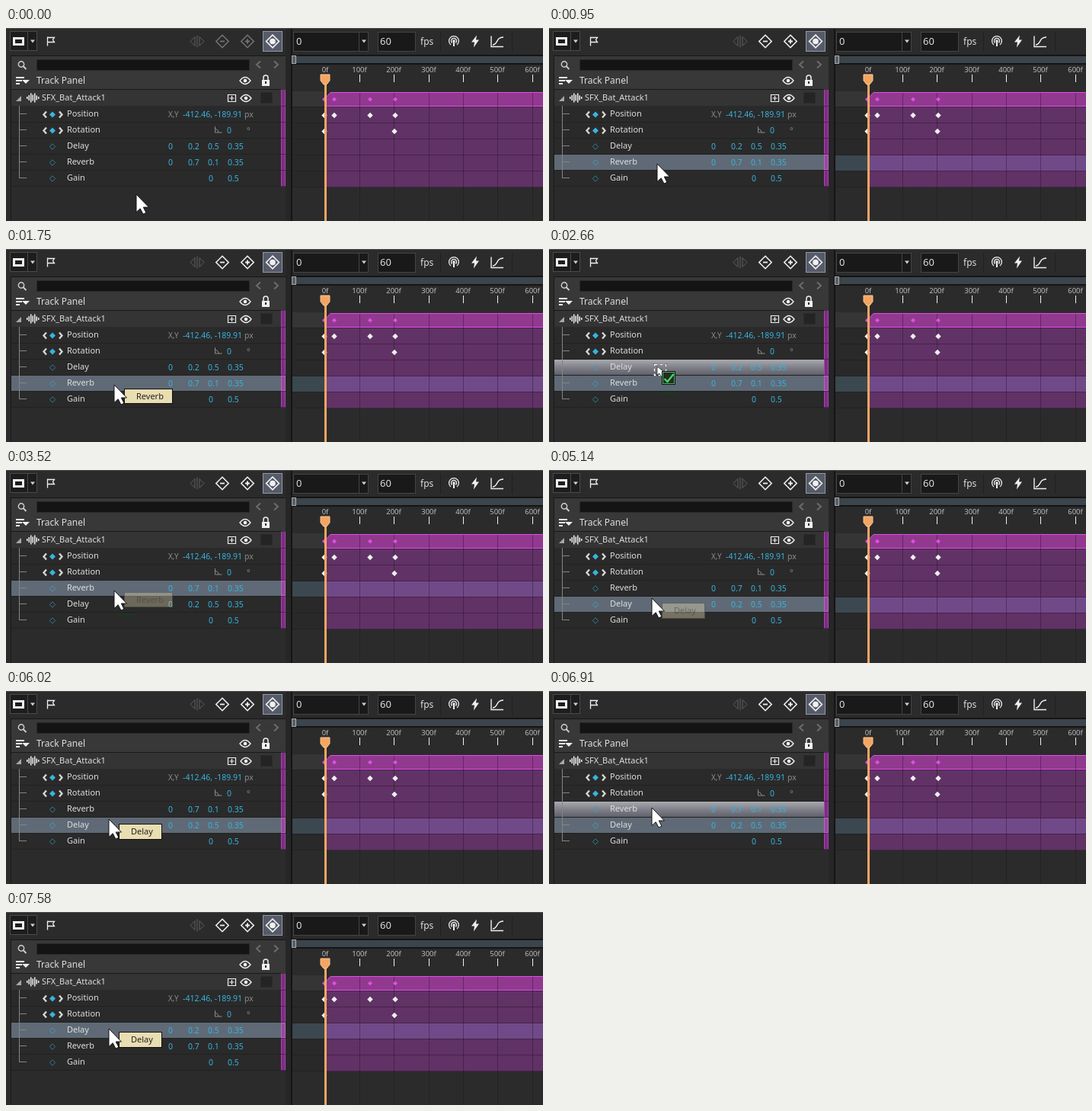
These frames come from a looping animation (705x253 px, 8000 ms). An HTML page with a canvas:

```html
<!DOCTYPE html>
<html lang="en">
<head>
<meta charset="utf-8">
<title>Track panel</title>
<style>
html, body { margin: 0; width: 100%; height: 100%; overflow: hidden; background: #2b2b2b; }
canvas { display: block; }
</style>
</head>
<body>
<canvas id="stage" width="705" height="253"></canvas>
<script>
const ctx = document.getElementById('stage').getContext('2d');
const LOOP = 8000, ROW = 21, FIRST_ROW = 103;
const CYAN = '#38b4de', WHITE = '#f0f0f0', GRAY = '#8a8a8a', PINK = '#e04ee6';
const GRID = [0, 1, 2, 3, 4, 5, 6].map(i => 419 + Math.floor(i * 136 / 3));

function rect(x, y, w, h, fill, border) {
  ctx.fillStyle = fill;
  ctx.fillRect(x, y, w, h);
  if (border) {
    ctx.strokeStyle = border;
    ctx.lineWidth = 1;
    ctx.strokeRect(x + .5, y + .5, w - 1, h - 1);
  }
}

function text(s, x, y, size = 11, color = '#dedede', align = 'left') {
  ctx.font = `${size}px "Noto Sans", "Open Sans", sans-serif`;
  ctx.textAlign = align;
  ctx.fillStyle = color;
  ctx.fillText(s, x, y);
}

// Draws SVG path data moved to (x, y).
function shape(d, x, y, fill, stroke, width = 1) {
  const path = new Path2D(d);
  ctx.save();
  ctx.translate(x, y);
  if (fill) { ctx.fillStyle = fill; ctx.fill(path); }
  if (stroke) { ctx.strokeStyle = stroke; ctx.lineWidth = width; ctx.stroke(path); }
  ctx.restore();
}

const diamond = (x, y, r, fill, stroke, width) =>
  shape(`M0 ${-r}L${r} 0L0 ${r}L${-r} 0Z`, x, y, fill, stroke, width);

const circle = (x, y, r, fill, stroke, width) =>
  shape(`M${-r} 0a${r} ${r} 0 1 0 ${2 * r} 0a${r} ${r} 0 1 0 ${-2 * r} 0Z`, x, y, fill, stroke, width);

const downArrow = (x, y) => shape('M-3 -1.5H3L0 2.5Z', x, y, '#d0d0d0');

function eye(x, y) {
  shape('M-7 0Q0 -9 7 0Q0 9 -7 0Z', x, y, null, WHITE, 1.3);
  circle(x, y, 2.3, WHITE);
}

function leftToolbar(active) {
  rect(5, 4, 36, 26, '#1d1d1d', '#4a4a4a');
  rect(28, 5, 1, 24, '#4a4a4a');
  rect(9, 12, 15, 11, WHITE);
  rect(12, 15, 9, 5, '#1d1d1d');
  downArrow(35, 17);
  shape('M0 0V12M0 1H9L7 4L9 7H0', 54.5, 11.5, null, WHITE, 1.3);

  const tone = active ? WHITE : '#737373';
  shape('M-3 -6V6L-9 0ZM3 -6V6L9 0ZM0 -8V8', 251, 17.5, null, '#606060');
  for (const x of [284, 317]) {
    diamond(x, 17.5, 8.2, null, tone, 1.6);
    shape(x === 284 ? 'M-3 0H3' : 'M-3 0H3M0 -3V3', x, 17.5, null, tone, 1.8);
  }
  rect(337, 4, 26, 27, '#555b69', '#9298a6');
  diamond(350, 17.5, 8.4, null, WHITE, 1.6);
  circle(350, 17.5, 3.8, WHITE);
}

function panelHeader() {
  rect(6, 36, 362, 45, '#383838');
  rect(6, 36, 362, 1, '#151515');
  circle(20, 47.5, 3.7, null, '#d0d0d0', 1.4);
  shape('M0 0L4 4', 22.5, 50, null, '#d0d0d0', 1.8);
  rect(40, 41, 280, 15, '#141414', '#2a2a2a');
  shape('M3 -4.5L-2 0L3 4.5', 331, 48, null, '#6c6c6c', 2);
  shape('M-3 -4.5L2 0L-3 4.5', 355, 48, null, '#6c6c6c', 2);
  shape('M0 0H11M0 4H8M0 8H5', 13, 65, null, WHITE, 1.8);
  shape('M-5 -2H5L0 3Z', 26, 70, WHITE);
  text('Track Panel', 40, 73, 12);
  eye(314, 69);
  shape('M-3 0V-3a3 3 0 0 1 6 0V0', 341, 68, null, WHITE, 1.5);
  rect(336, 68, 10, 8, WHITE);
  rect(340, 70, 2, 3, '#232323');
}

function groupRow() {
  rect(7, 81, 354, 21, '#343434');
  rect(7, 80, 354, 1, '#191919');
  shape('M7 -7V0H0Z', 13, 96, '#a8a8a8');
  [3, 7, 12, 8, 12, 6, 3].forEach((h, i) => rect(27 + i * 2.5, 91.5 - h / 2, 1.5, h, WHITE));
  text('SFX_Bat_Attack1', 47, 95);
  shape('M-5 -4.5H5V4.5H-5ZM-3 0H3M0 -3V3', 296.5, 92, null, WHITE, 1.2);
  eye(315, 92);
  rect(334, 84, 16, 15, '#242424', '#2b2b2b');
}

const SETS = {
  Delay: ['0', '0.2', '0.5', '0.35'],
  Reverb: ['0', '0.7', '0.1', '0.35'],
  Gain: ['', '', '0', '0.5']
};

function trackRow(name, i, look) {
  const y = FIRST_ROW + i * ROW, mid = y + 10;
  let fill = '#2a2a2a';
  if (look === 'selected') fill = '#5f6a76';
  if (look === 'drop') {
    fill = ctx.createLinearGradient(0, y, 0, y + ROW);
    fill.addColorStop(0, '#a9a9b0');
    fill.addColorStop(.5, '#7f7f88');
    fill.addColorStop(1, '#5d5e68');
  }
  rect(7, y, 354, ROW, fill);
  rect(7, y + ROW - 1, 354, 1, '#212121');
  rect(18, mid - 1, 9, 1, '#858585');
  text(name, 80, mid + 3);

  if (i < 2) {
    diamond(61, mid + .5, 4, CYAN);
    shape('M2 -4L-1.5 0L2 4', 51, mid + .5, null, '#d8d8d8', 2.3);
    shape('M-2 -4L1.5 0L-2 4', 72, mid + .5, null, '#d8d8d8', 2.3);
  } else {
    diamond(61, mid + .5, 3.7, null, look ? '#459bb4' : '#317f95');
    SETS[name].forEach((v, k) => {
      const x = name === 'Gain' && k === 2 ? 266 : 213 + k * 26;
      text(v, x, mid + 4, 10.5, CYAN);
    });
  }
}

function leftPanel(s) {
  panelHeader();
  groupRow();
  ['Position', 'Rotation', ...s.order, 'Gain'].forEach((name, i) =>
    trackRow(name, i, i === s.selected ? 'selected' : i === s.drop ? 'drop' : ''));
  text('X,Y', 213, 117, 10, GRAY);
  text('-412.46, -189.91', 232, 117, 10.5, CYAN);
  text('px', 313, 117, 10.5, GRAY);
  shape('M0 -8V0H9M0 -5Q4 -4 5 0', 274.5, 137, null, GRAY);
  text('0', 290, 137.5, 10.5, CYAN);
  text('°', 316, 138, 11, GRAY);
  rect(17, 102, 1, 95, '#858585');

  rect(361, 81, 6, 127, '#7d2c84');
  rect(361, 81, 1, 127, '#a645ad');
  rect(366, 81, 1, 127, '#a645ad');
  for (let i = 0; i < 6; i++) rect(361, 102 + i * ROW, 6, 1, '#5b2260');
  if (s.selected >= 0) rect(361, FIRST_ROW + s.selected * ROW, 6, 20, '#954a9e', '#b865c0');
}

function rightToolbar() {
  rect(377, 5, 99, 26, '#191919', '#444');
  rect(463, 6, 1, 24, '#444');
  text('0', 381, 22, 13);
  downArrow(470, 17);
  rect(488, 5, 50, 26, '#191919', '#444');
  text('60', 491, 22, 13);
  text('fps', 544, 22, 12);
  rect(570, 5, 1, 26, '#202020');
  rect(664, 5, 1, 26, '#202020');
  shape('M-4 5a6.4 6.4 0 1 1 8 0M-2.3 2.6a3.5 3.5 0 1 1 4.6 0', 588, 17, null, WHITE, 1.3);
  circle(588, 17, 1.7, WHITE);
  rect(587, 18, 2, 6, WHITE);
  shape('M2 -8L-5 1H-1L-2 8L5 -2H1Z', 616, 17.5, WHITE);
  shape('M0 0V14H16', 637, 10.5, null, WHITE, 1.4);
  shape('M1 11C8 11 5 1 15 1', 638, 11, null, WHITE, 1.4);
}

function timeline(selected) {
  rect(375, 35, 330, 13, '#151515');
  rect(377, 37, 328, 9, '#3c444c');
  rect(375, 36, 6, 11, '#5a6068', '#a4acb4');
  rect(376, 48, 329, 35, '#2b2b2b');
  GRID.forEach((x, i) => {
    text(i ? i * 100 + 'f' : '0f', x, 58, 9.5, '#bdbdbd', 'center');
    rect(x, 61, 1, 10, WHITE);
  });

  rect(376, 83, 43, 20, '#353535');
  rect(376, FIRST_ROW, 329, 5 * ROW + 1, '#222');
  rect(419, FIRST_ROW, 286, 5 * ROW + 1, '#45224a');
  for (let i = 0; i < 5; i++) {
    const y = FIRST_ROW + 1 + i * ROW, on = i === selected;
    rect(376, y, 43, ROW - 1, on ? '#3c4850' : '#292929');
    rect(419, y, 286, ROW - 1, on ? '#704a88' : '#613265');
  }
  shape('M7 0H286V19H0V8Z', 419, 84, '#91398f');
  shape('M0 8L7 .5H286M0 18.5H286', 419, 84, null, PINK);
  for (const x of GRID.slice(1)) {
    rect(x, 85, 1, 124, 'rgba(35,10,40,.4)');
    rect(x, 209, 1, 44, '#232323');
  }
  for (const x of [418, 431, 478, 511]) {
    diamond(x, 93.5, 3, PINK);
    diamond(x, 114.5, 3.7, WHITE);
  }
  diamond(418, 135.5, 3.7, WHITE);
  diamond(510, 135.5, 3.7, WHITE);
  rect(418, 70, 3, 183, '#f3a663');
  shape('M-6 0H6V8L2 13H-2L-6 8Z', 419, 61, '#f3a663', '#ffc692');
}

function tooltip(label, x, y, w, h, alpha) {
  ctx.globalAlpha = alpha;
  rect(x, y, w, h, '#e9ddb2', '#111');
  text(label, x + 16, y + 14, 11, '#222');
  ctx.globalAlpha = 1;
}

const pointer = (x, y) =>
  shape('M0 0V23.5L5.2 18.7L9 26L13 24.2L9.3 17H16.5Z', x, y + 1, '#fff', '#111');

function dragPointer(x, y) {
  ctx.save();
  ctx.setLineDash([4, 3]);
  shape('M-3.5 -5.5H11.5V8.5H-3.5Z', x, y, null, '#111', 3);
  shape('M-3.5 -5.5H11.5V8.5H-3.5Z', x, y, null, '#fff', 2);
  ctx.restore();
  shape('M0 0V11L3 9L6 14L8.5 12.5L6 8H10Z', x, y - 3, '#fff', '#222', .7);
  rect(x + 6, y + 3, 18, 18, '#222b24', '#0c160e');
  rect(x + 7, y + 4, 16, 16, '#252c27', '#4fae63');
  shape('M0 4L4 8L12 -2', x + 9.5, y + 9, null, '#48d45e', 2.4);
}

// Eased progress from start to end, advancing in n visible steps.
function progress(t, start, end, n) {
  if (t < start) return 0;
  if (t >= end) return 1;
  const p = Math.floor((t - start) / (end - start) * (n - 1)) / (n - 1);
  return p * p * (3 - 2 * p);
}

// start, end, steps, x, y
const MOVES = [
  [70, 620, 9, 142, 177],
  [1960, 2510, 8, 142, 160],
  [2580, 2660, 2, 142, 157],
  [4250, 4600, 6, 135, 167],
  [6160, 6580, 7, 135, 152]
];

// label, x, y, width, height, start of fade, fade time, end
const TIPS = [
  ['Reverb', 155, 183, 64, 20, 1080, 70, 1890],
  ['Reverb', 155, 160, 64, 20, 3520, 140, 4320],
  ['Delay', 148, 174, 57, 21, 5130, 140, 6090],
  ['Delay', 148, 157, 57, 21, 7510, 70, LOOP]
];

const within = (t, a, b) => t >= a && t < b;

function state(t) {
  let x = 171, y = 217;
  for (const [start, end, n, tx, ty] of MOVES) {
    const p = progress(t, start, end, n);
    x += (tx - x) * p;
    y += (ty - y) * p;
  }
  const dragging = within(t, 1960, 2990) || within(t, 6160, 6910);
  const dropping = dragging || within(t, 6910, 6980);
  const top = within(t, 2990, 5000) || t >= 6980;
  return {
    x: Math.round(x), y: Math.round(y), dragging,
    order: within(t, 2990, 6980) ? ['Reverb', 'Delay'] : ['Delay', 'Reverb'],
    selected: t < 950 ? -1 : top ? 2 : 3,
    drop: dropping && y < 166 ? 2 : -1,
    trail: within(t, 2300, 4390)
  };
}

function draw(t) {
  const s = state(t);
  rect(0, 0, 705, 253, '#2b2b2b');
  rect(0, 0, 705, 1, '#505050');
  leftToolbar(s.selected >= 0);
  leftPanel(s);
  rect(6, 36, 1, 217, '#191919');
  rect(367, 1, 8, 252, '#262626');
  rect(374, 1, 2, 252, '#151515');
  rightToolbar();
  timeline(s.selected);
  if (s.trail) rect(147, 188, 19, 3, '#1b3720');
  for (const [label, x, y, w, h, start, fade, end] of TIPS)
    if (within(t, start, end))
      tooltip(label, x, y, w, h, Math.min(1, .35 + .65 * (t - start) / fade));
  (s.dragging ? dragPointer : pointer)(s.x, s.y);
}

function tick() {
  draw(performance.now() % LOOP);
  requestAnimationFrame(tick);
}
tick();
</script>
</body>
</html>
```
